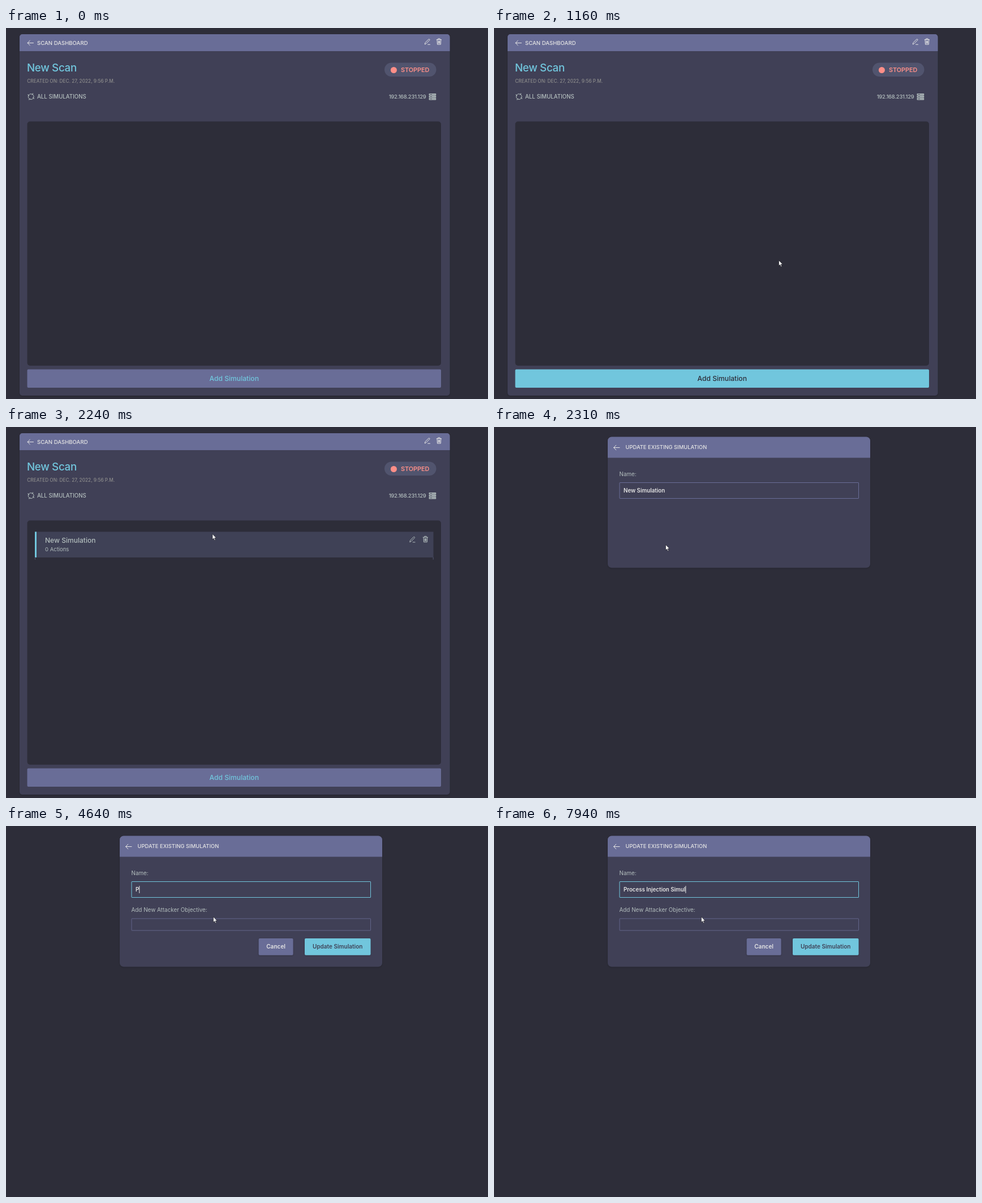
Animation, 852 px wide and 657 px high, one loop 8 s. Source, as an HTML page:

```html
<!DOCTYPE html>
<html lang="en">
<head>
<meta charset="utf-8">
<title>Scan dashboard</title>
<style>
  html, body { margin: 0; width: 100%; height: 100%; overflow: hidden; background: #2d2d39; }
  svg { display: block; width: 100%; height: 100%; }
  text { font-family: Inter, "Open Sans", sans-serif; white-space: pre; }
  .line { fill: none; stroke-width: 1; stroke-linecap: round; stroke-linejoin: round; }
</style>
</head>
<body>
<svg id="stage" viewBox="0 0 852 657" xmlns="http://www.w3.org/2000/svg"></svg>
<script>
const LOOP = 8000;
const C = {
  main: '#71c6dd', dark: '#3f4156', medium: '#51546e', bar: '#696d97',
  light: '#e5e5e5', gray: '#8b8b8b', pale: '#b2bdbd', bg: '#2d2d39', stop: '#ff8f88'
};

// Markup helpers
const rect = (x, y, w, h, fill, r = 0, extra = '') =>
  `<rect x="${x}" y="${y}" width="${w}" height="${h}" rx="${r}" fill="${fill}" ${extra}/>`;
const text = (x, y, size, weight, fill, str, extra = '') =>
  `<text x="${x}" y="${y}" font-size="${size}" font-weight="${weight}" fill="${fill}" ${extra}>${str}</text>`;
const line = (d, color, extra = '') => `<path class="line" d="${d}" stroke="${color}" ${extra}/>`;
const at = (x, y, body) => `<g transform="translate(${x} ${y})">${body}</g>`;
const card = (x, y, w, h, head, r) =>
  rect(x, y, w, h, C.dark, r, 'filter="url(#soft)"') +
  `<path d="M${x} ${y + head}v${r - head}a${r} ${r} 0 0 1 ${r} ${-r}h${w - 2 * r}a${r} ${r} 0 0 1 ${r} ${r}v${head - r}z" fill="${C.bar}"/>`;

// Icons, drawn from their top left corner
const back = (x, y) => at(x, y, line('M11 4.5H.5M4.8 .3L.5 4.5L4.8 8.7', C.light));
const pencil = (x, y, color) => at(x, y,
  line('M.8 9.6L1.6 6.8L7.4 1Q8.3 .2 9.1 1T9.1 2.7L3.4 8.5ZM6.2 10.2H10', color, 'stroke-width=".9"'));
const trash = (x, y, color) => at(x, y,
  line('M.5 2.3H8.9M3 2.2V.6H6.4V2.2M1.3 2.5L1.8 10.8H7.6L8.1 2.5M3.4 4.6V8.9M4.7 4.6V8.9M6 4.6V8.9', color));
const cycle = (x, y) => at(x, y, [0, 90, 180, 270].map(a =>
  `<g transform="rotate(${a})">` + line('M-2.6 -4.3A5 5 0 0 1 2.9 -4.1M3.3 -5.6V-3.7H1.4', C.pale) + '</g>').join(''));
const server = (x, y) => at(x, y, [0, 4, 8].map(dy =>
  rect(0, dy, 12.6, 3.4, C.pale, .7) +
  line(`M2 ${dy + 1.7}H5.6M8 ${dy + 1.7}h.1M10.3 ${dy + 1.7}h.1`, C.dark)).join(''));

const dashboard =
  card(24, 11, 760.5, 640, 30, 5) +
  back(37.5, 22) +
  text(55, 29.7, 9.6, 500, C.light, 'SCAN DASHBOARD') +
  pencil(739.5, 19, C.light) + trash(760.7, 18.3, C.light) +
  text(37, 77, 18.8, 500, C.main, 'New Scan', 'letter-spacing="-.35"') +
  text(37.3, 97, 8.25, 500, C.gray, 'CREATED ON: DEC. 27, 2022, 9:56 P.M.') +
  rect(669, 61.5, 91.5, 24.5, C.medium, 12.25) +
  `<circle cx="685.4" cy="74.5" r="5.5" fill="${C.stop}"/>` +
  text(698, 77.8, 10.8, 600, C.stop, 'STOPPED') +
  cycle(44.2, 121.6) +
  text(55, 125, 9.7, 500, C.pale, 'ALL SIMULATIONS') +
  text(742.5, 125, 9.5, 500, C.pale, '192.168.231.129', 'text-anchor="end" letter-spacing="-.28"') +
  server(747.6, 116) +
  rect(37.5, 165.5, 731.5, 432.5, C.bg, 5) +
  '<g id="row">' +
    rect(51, 185.5, 704.5, 45.5, C.dark) + rect(51, 185.5, 3, 45.5, C.main) +
    line('M51.5 231V234.5M755.2 231V234.5', C.medium) +
    text(69, 204.6, 12.05, 500, C.pale, 'New Simulation') +
    text(69, 220.2, 9.5, 400, C.pale, '0 Actions') +
    pencil(713, 193.8, C.pale) + trash(736.7, 193, C.pale) +
  '</g>' +
  rect(37.5, 604.5, 731.5, 32.5, C.bar, 2, 'id="addBox"') +
  text(403.2, 624.8, 12.15, 500, C.main, 'Add Simulation', 'id="addText" text-anchor="middle"');

const form =
  card(201, 17.5, 464, 231.8, 37, 7) +
  back(211, 32) +
  text(232.5, 39.4, 9.4, 500, C.light, 'UPDATE EXISTING SIMULATION') +
  text(221.5, 86.5, 9.8, 400, C.pale, 'Name:') +
  rect(222, 98.5, 422.5, 28, 'none', .5, 'id="field" stroke-width="1"') +
  rect(229, 105, 0, 14, '#0078d7', 0, 'id="mark"') +
  text(229, 116, 9.72, 600, C.light, '', 'id="name" xml:space="preserve"') +
  rect(0, 106, 1, 13, C.light, 0, 'id="caret"') +
  '<g id="rest">' +
    text(221.5, 151.5, 9.87, 400, C.pale, 'Add New Attacker Objective:') +
    rect(222, 164, 422.5, 21, 'none', .5, `stroke="${C.bar}" stroke-opacity=".8"`) +
    rect(446.7, 199, 60.8, 29.8, C.bar, 2, 'filter="url(#soft)"') +
    text(477.1, 217, 10.05, 600, C.light, 'Cancel', 'text-anchor="middle"') +
    rect(528, 199, 116.5, 29.8, C.main, 2, 'filter="url(#soft)"') +
    text(586.2, 217, 10, 600, C.dark, 'Update Simulation', 'text-anchor="middle"') +
  '</g>';

const $ = id => document.getElementById(id);
$('stage').innerHTML =
  '<defs><filter id="soft" x="-10%" y="-10%" width="120%" height="125%">' +
  '<feDropShadow dx="0" dy="1" stdDeviation="1.5" flood-color="#000" flood-opacity=".2"/></filter></defs>' +
  rect(0, 0, 852, 657, C.bg) +
  `<g id="dashboard">${dashboard}</g><g id="form">${form}</g>` +
  '<g id="pointer"><path id="arrow" d="M0 0V9.6L2.2 7.6L3.7 11.2L5.2 10.6L3.7 7.1H6.7Z" fill="#fff" stroke="#15151c" stroke-width=".6"/>' +
  line('M-2.5 -6.5Q0 -6.5 0 -5.5Q0 -6.5 2.5 -6.5M0 -5.5V5.5M-2.5 6.5Q0 6.5 0 5.5Q0 6.5 2.5 6.5', '#fff', 'id="beam"') + '</g>';

// Pointer stops: time, x, y
const path = [
  [260, 600, 55], [900, 470, 618], [1020, 470, 618], [1160, 503.5, 411.5],
  [1290, 540, 357], [1490, 540, 357], [1850, 718, 198], [1950, 718, 198],
  [2240, 365, 189.5], [2310, 303.5, 208.5], [2600, 305, 112], [2720, 305, 112],
  [3080, 239, 112], [3220, 201, 112], [3420, 201, 112], [3910, 366.5, 160.8]
];

const PHRASE = 'Process Injection Simul';
// Key presses: time, letters typed so far
const keys = [
  [4640, 1], [4970, 2], [5070, 3], [5170, 4], [5270, 5], [5370, 6], [5570, 7],
  [6040, 8], [6240, 9], [6510, 10], [6590, 11], [6670, 12], [6750, 13], [6840, 14],
  [6920, 15], [7000, 16], [7180, 18], [7330, 19], [7420, 20], [7600, 21], [7800, 22], [7870, 23]
];

const clamp = v => Math.min(1, Math.max(0, v));
const ramp = (t, a, b) => clamp((t - a) / (b - a));
const ease = k => k * k * (3 - 2 * k);
const show = (id, on) => $(id).setAttribute('visibility', on ? 'inherit' : 'hidden');
const set = (id, attr, value) => $(id).setAttribute(attr, value);

function mix(a, b, k) {
  const part = (hex, i) => parseInt(hex.slice(i, i + 2), 16);
  return `rgb(${[1, 3, 5].map(i => Math.round(part(a, i) + (part(b, i) - part(a, i)) * k))})`;
}

function pointerAt(t) {
  let i = 0;
  while (i < path.length - 2 && t >= path[i + 1][0]) i++;
  const [t0, x0, y0] = path[i], [t1, x1, y1] = path[i + 1];
  const k = ease(ramp(t, t0, t1));
  return [x0 + (x1 - x0) * k, y0 + (y1 - y0) * k];
}

function drawDashboard(t) {
  const hover = ramp(t, 770, 880) * (1 - ramp(t, 1170, 1290));
  show('row', t >= 1490);
  set('addBox', 'fill', mix(C.bar, C.main, hover));
  set('addText', 'fill', mix(C.main, C.bg, hover));
}

function drawForm(t, px) {
  const key = keys.filter(k => t >= k[0]).pop();
  const typed = key ? PHRASE.slice(0, key[1]) : 'New Simulation';
  const focus = t >= 2650;
  if ($('name').textContent !== typed) $('name').textContent = typed;
  const end = 229 + $('name').getComputedTextLength();

  const dragging = t >= 2720 && !key;
  const left = t >= 3220 ? 229 : Math.min(end, Math.max(229, px));
  set('mark', 'x', left);
  set('mark', 'width', dragging ? end - left : 0);

  set('field', 'stroke', focus ? C.main : C.bar);
  set('caret', 'x', end);
  show('caret', focus && !dragging && !(t >= 5770 && t < 6040));
  show('rest', t >= 2380);
}

function draw(t) {
  const editing = t >= 2310;
  const [x, y] = pointerAt(t);
  show('dashboard', !editing);
  show('form', editing);
  if (editing) drawForm(t, x); else drawDashboard(t);

  const beam = editing && t < 3500 && y > 98 && y < 127;
  set('pointer', 'transform', `translate(${x} ${y})`);
  show('pointer', t >= 260);
  show('arrow', !beam);
  show('beam', beam);
}

const start = performance.now();
function tick() {
  draw((performance.now() - start) % LOOP);
  requestAnimationFrame(tick);
}
tick();
</script>
</body>
</html>
```
